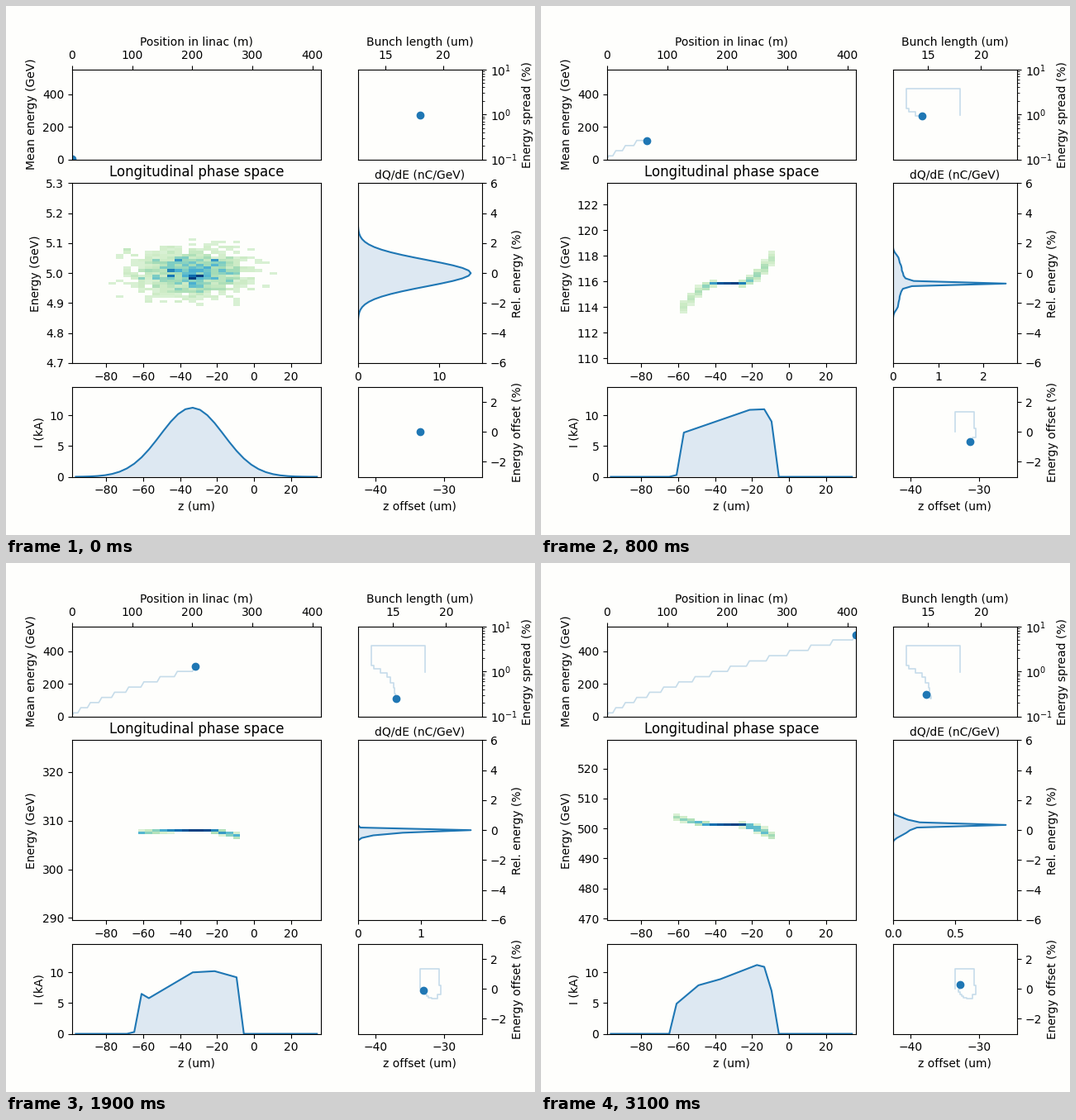
A matplotlib script that plays this animation: 640 px wide and 640 px high, repeating every 3200 ms.

```python
import numpy as np
import matplotlib.pyplot as plt
from matplotlib.animation import FuncAnimation

BLUE, PAPER, SHADE = "tab:blue", "#fefefc", "#dde8f2"
FRAMES = 32                         # one stage and one drift per two frames
NZ, NE = 34, 69                     # bins in z and in relative energy
STEP = 12 / NE                      # energy bin in percent
GAIN = 31.9                         # GeV per stage, the first one is half
IMAX = 11.25                        # peak current at the start in kA

z_edges = np.linspace(-98.5, 36.1, NZ + 1)
z_mid = (z_edges[1:] + z_edges[:-1]) / 2
slices = np.arange(NZ)
rows = np.arange(NE) - NE // 2
rel_energy = rows * STEP


def keyed(points):
    """Piecewise linear function through a few key points."""
    xs = sorted(points)
    return lambda x: np.interp(x, xs, [points[k] for k in xs])


# Changed by the drifts
bunch_length = keyed({0: 18, 1: 13, 2: 13.2, 4: 14.45, 6: 15.08, 9: 15.3, 15: 14.85})
z_offset = keyed({0: -33.52, 1: -30.8, 2: -30.5, 6: -32.27, 9: -33.02, 15: -32.8})
profiles = {
    0: IMAX * np.exp(-((z_mid + 33.5) / 17.2) ** 2 / 2),
    1: keyed({10: 0, 11: 9.2, 12: 11.4, 13: 9.5, 16: 8.6, 19: 11.7, 21: 18.8, 22: 0})(slices),
    4: keyed({8: 0, 9: .3, 10: 7.2, 19: 10.9, 21: 11, 22: 9, 23: 0})(slices),
    9: keyed({7: 0, 8: .3, 9: 6.5, 10: 5.8, 16: 10, 19: 10.2, 22: 9.2, 23: 0})(slices),
    15: keyed({8: 0, 9: 4.9, 12: 7.9, 15: 8.9, 20: 11.2, 21: 10.9, 22: 7, 23: 0})(slices),
}

# Changed by the stages
energy_offset = keyed({0: 0, 1: 1.33, 2: .23, 3: -.38, 4: -.65, 6: -.6, 10: -.1, 16: .3})
energy_spread = keyed({0: .97, 1: 3.75, 2: 1.35, 4: .925, 6: .556, 8: .32, 10: .25, 16: .308})
spec_peak = keyed({0: 13.9, 1: .85, 2: 5.65, 4: 2.49, 6: 1.2, 10: 1.79, 12: 1.48, 16: .907})
core_row = keyed({2: 1, 4: -4, 6: -4, 10: 0, 12: 1, 16: 2})
core_tilt = keyed({4: 0, 6: .25, 10: 0})
head_bend = keyed({2: 1.1, 4: 1.2, 6: .5, 10: -.27, 16: -.52})
tail_bend = keyed({2: 1.05, 4: 1.1, 6: .5, 10: .08, 12: -.13, 16: -.26})


def current(m):
    """Current in each slice after m drifts."""
    return np.array([np.interp(m, list(profiles), column)
                     for column in zip(*profiles.values())])


def nominal(n):
    return 5 + GAIN * max(n - 0.5, 0)


def position(n, m):
    drift = sum(1.512 * np.sqrt(nominal(k)) for k in range(1, m + 1))
    return drift + 5 * max(n - 0.5, 0)


def chirp(n, m):
    """Mean energy row and width of each slice."""
    if n == 0:
        return np.zeros(NZ), np.full(NZ, 5.1)
    if n == 1:
        slope = energy_spread(1) / bunch_length(m)
        return (energy_offset(1) - slope * (z_mid - z_offset(m))) / STEP, np.full(NZ, 2.0)
    centre = (np.round(core_row(n)) + core_tilt(n) * np.clip(slices - 14, 0, 4)
              + head_bend(n) * np.clip(slices - 18, 0, None) ** 1.5
              - tail_bend(n) * np.clip(14 - slices, 0, None) ** 1.5)
    return centre, 0.35 + 0.35 * np.abs(np.gradient(centre))


def density(n, m):
    centre, width = chirp(n, m)
    wide = np.arange(-110, 111)[:, None]
    share = np.exp(-((wide - centre) / width) ** 2 / 2)
    h = (current(m) * share / share.sum(axis=0))[110 + rows]
    return h / h.max()


def cells(n, m):
    """Colour values of the phase space; the first bunches are grainy."""
    h = density(n, m)
    if n < 2:
        h = np.random.default_rng(4).poisson(14 * h)
        h = h / h.max()
    return np.ma.masked_less(0.1 + 0.9 * h, 0.17 if n < 2 else 0.14)


def spectrum(n, m):
    s = density(n, m).sum(axis=1)
    return spec_peak(n) * s / s.max()


# Layout
fig, axes = plt.subplots(3, 2, figsize=(6.4, 6.4), dpi=100, facecolor=PAPER,
                         gridspec_kw=dict(width_ratios=[2, 1], height_ratios=[1, 2, 1]))
(ax_gain, ax_spread), (ax_phase, ax_spec), (ax_cur, ax_off) = axes
for ax in axes.flat:
    ax.set_facecolor(PAPER)
for ax in (ax_gain, ax_spread):
    ax.xaxis.tick_top()
    ax.xaxis.set_label_position("top")
for ax in axes[:, 1]:
    ax.yaxis.tick_right()
    ax.yaxis.set_label_position("right")
ax_spec.xaxis.set_label_position("top")


def trail(ax):
    path, = ax.plot([], [], color=BLUE, alpha=0.25, linewidth=1.2)
    dot, = ax.plot([], [], "o", color=BLUE)
    return path, dot


def filled(ax):
    area, = ax.fill([0, 0, 0], [0, 0, 0], color=SHADE, linewidth=0)
    edge, = ax.plot([], [], color=BLUE)
    return area, edge


steps = [((i + 1) // 2, i // 2) for i in range(FRAMES)]
way = [position(n, m) for n, m in steps]
energy = [nominal(n) * (1 + energy_offset(n) / 100) for n, _ in steps]
length = [bunch_length(m) for _, m in steps]
spread = [energy_spread(n) for n, _ in steps]
shift = [z_offset(m) for _, m in steps]
offset = [energy_offset(n) for n, _ in steps]
trails = [(*trail(ax_gain), way, energy), (*trail(ax_spread), length, spread),
          (*trail(ax_off), shift, offset)]

spec_area, spec_edge = filled(ax_spec)
cur_area, cur_edge = filled(ax_cur)
mesh = ax_phase.pcolormesh(z_edges, np.linspace(0, 1, NE + 1), cells(0, 0), cmap="GnBu",
                           vmin=0, vmax=1, transform=ax_phase.get_xaxis_transform())

z_range = (z_edges[0], z_edges[-1])
ax_gain.set(xlim=(0, way[-1]), ylim=(0, 1.1 * energy[-1]),
            xlabel="Position in linac (m)", ylabel="Mean energy (GeV)")
ax_spread.set(yscale="log", ylim=(0.1, 10),
              xlabel="Bunch length (um)", ylabel="Energy spread (%)")
ax_phase.set(xlim=z_range, ylabel="Energy (GeV)", title="Longitudinal phase space")
ax_spec.set(ylim=(-6, 6), xlabel="dQ/dE (nC/GeV)", ylabel="Rel. energy (%)")
ax_cur.set(xlim=z_range, ylim=(0, 1.3 * IMAX), xlabel="z (um)", ylabel="I (kA)")
ax_off.set(xlim=(shift[0] - 9, shift[0] + 9), ylim=(-3, 3),
           xlabel="z offset (um)", ylabel="Energy offset (%)")


def draw(i):
    n, m = steps[i]
    for path, dot, xs, ys in trails:
        path.set_data(xs[:i + 1], ys[:i + 1])
        dot.set_data([xs[i]], [ys[i]])
    ax_spread.set_xlim(min(0.7 * length[0], 0.9 * min(length[:i + 1])), 1.3 * length[0])

    mesh.set_array(cells(n, m))
    ax_phase.set_ylim(0.94 * nominal(n), 1.06 * nominal(n))

    s = spectrum(n, m)
    spec_edge.set_data(s, rel_energy)
    spec_area.set_xy(np.column_stack([np.r_[0, s, 0], np.r_[-6, rel_energy, 6]]))
    ax_spec.set_xlim(0, 1.1 * s.max())

    c = current(m)
    cur_edge.set_data(z_mid, c)
    cur_area.set_xy(np.column_stack([np.r_[z_mid[0], z_mid, z_mid[-1]], np.r_[0, c, 0]]))
    return []


anim = FuncAnimation(fig, draw, frames=FRAMES, interval=100, init_func=lambda: draw(0),
                     repeat=True, repeat_delay=0, blit=False)
plt.show()
```
